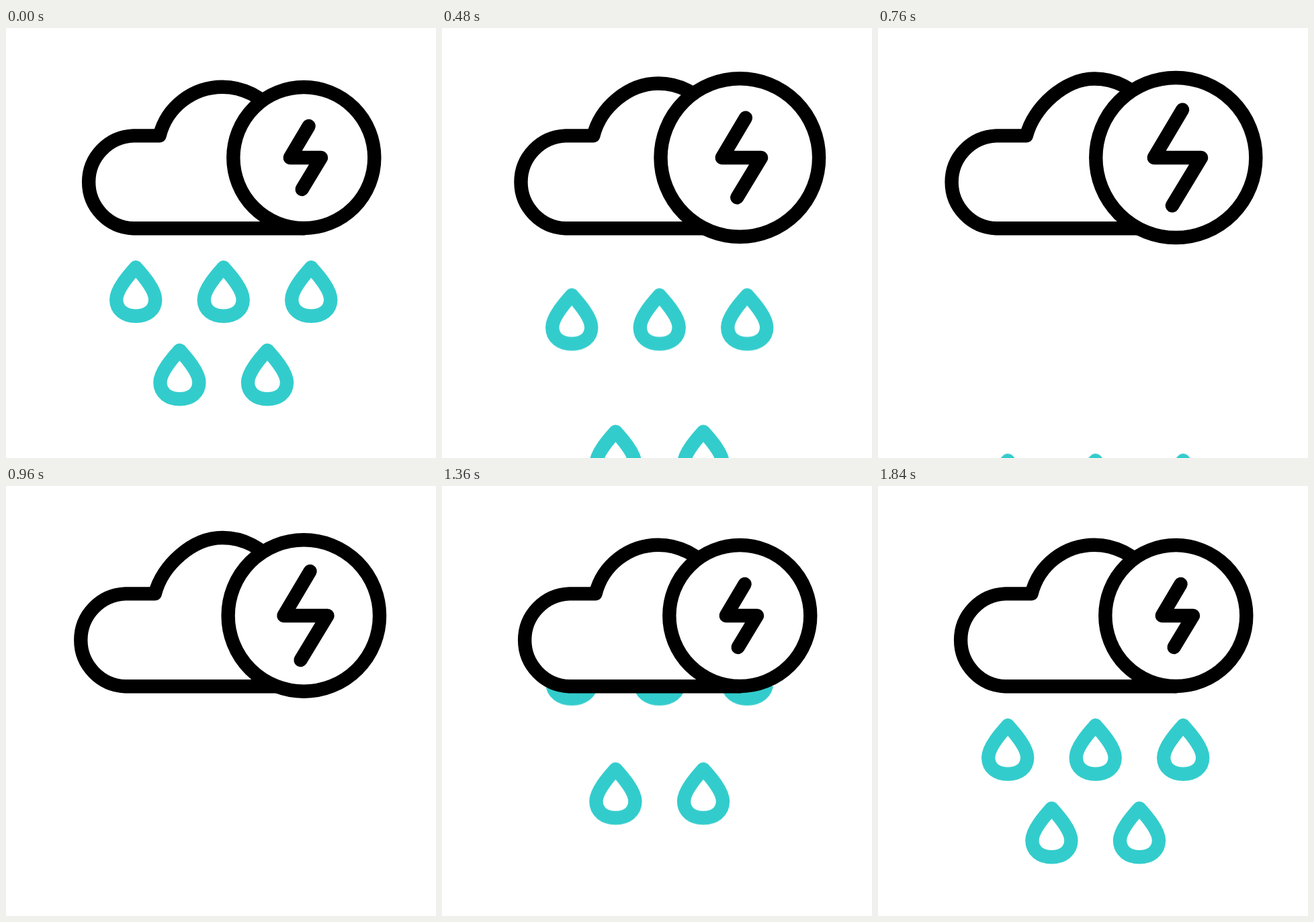
An HTML page for the animation above (1.92 s loop, 640 px wide and 640 px high).

```html
<!DOCTYPE html>
<html lang="en">
<head>
<meta charset="utf-8">
<title>Thunderstorm</title>
<style>
  html, body { margin: 0; width: 100%; height: 100%; overflow: hidden; background: #fff; }
  svg { display: block; width: 100%; height: 100%; }

  .line { fill: #fff; stroke: #000; stroke-width: 20.4; stroke-linecap: round; stroke-linejoin: round; }
  .rain { fill: none; stroke: #3cc; stroke-width: 20.4; stroke-linejoin: round; }
  .bolt { fill: none; }

  .cloud, .disc, .bolt, .near, .far {
    animation: 1920ms cubic-bezier(.3333, 0, .6667, 1) infinite;
  }
  .cloud { animation-name: cloud; }
  .disc { animation-name: disc; }
  .bolt { animation-name: bolt; }
  .near { animation-name: near; }
  .far { animation-name: far; }

  @keyframes disc {
    0%, 2.083%, 66.667%, 100% { r: 105px; }
    33.333% { r: 120.5px; }
  }

  @keyframes bolt {
    0%, 11.25%, 69.64%, 100% { d: path("M450.6 146L422.7 193L469 193L440.6 240"); }
    38.7%, 41.6% { d: path("M453.1 121.6L410.7 193L481.1 193L437.9 264.4"); }
  }

  /* The left lobe stretches sideways while the dome rises */
  @keyframes cloud {
    0%, 14.6%, 68.1%, 100% {
      d: path("M443 298.3L189.5 298.3A69 69 0 0 1 189.5 160.4L228.5 160.4C239.4 117.6 277.8 87.7 322 87.7A96.5 96.5 0 0 1 400 127.4");
    }
    38%, 45% {
      d: path("M443 298.3L176 298.3A69 69 0 0 1 176 160.4L220.8 160.4C231.7 117.6 277.8 75.5 322 75.5A96.5 96.5 0 0 1 400 115.2");
    }
  }

  /* Rain accelerates out of the stage, then eases back in from the cloud */
  @keyframes near {
    0%, 9.01% { transform: translateY(0); animation-timing-function: cubic-bezier(.3333, 0, .6667, 0); }
    41.667% { transform: translateY(348.5px); animation-timing-function: step-start; }
    41.7% { transform: translateY(-258px); }
    60.417% { transform: translateY(-258px); animation-timing-function: cubic-bezier(.3333, .8333, .6667, 1); }
    96.875%, 100% { transform: translateY(0); }
  }
  @keyframes far {
    0%, 2.083% { transform: translateY(0); animation-timing-function: cubic-bezier(.3333, 0, .6667, 0); }
    31.25% { transform: translateY(248px); animation-timing-function: step-start; }
    31.3% { transform: translateY(-258px); }
    54.167% { transform: translateY(-258px); animation-timing-function: cubic-bezier(.3333, .8333, .6667, 1); }
    90.625%, 100% { transform: translateY(0); }
  }
</style>
</head>
<body>
<svg viewBox="0 0 640 640">
  <defs>
    <path id="drop" d="M0 0C8 9 29 32 29 48C29 64 16 72.6 0 72.6C-16 72.6 -29 64 -29 48C-29 32 -8 9 0 0Z"/>
    <clipPath id="below"><rect y="298" width="640" height="342"/></clipPath>
  </defs>

  <g class="rain" clip-path="url(#below)">
    <g class="near">
      <use href="#drop" x="193.2" y="356.2"/>
      <use href="#drop" x="323.7" y="356.2"/>
      <use href="#drop" x="454.2" y="356.2"/>
    </g>
    <g class="far">
      <use href="#drop" x="258.4" y="479.6"/>
      <use href="#drop" x="389" y="479.6"/>
    </g>
  </g>

  <path class="line cloud"/>
  <circle class="line disc" cx="443.3" cy="193" r="105"/>
  <path class="line bolt" style="fill: none"/>
</svg>
</body>
</html>
```
